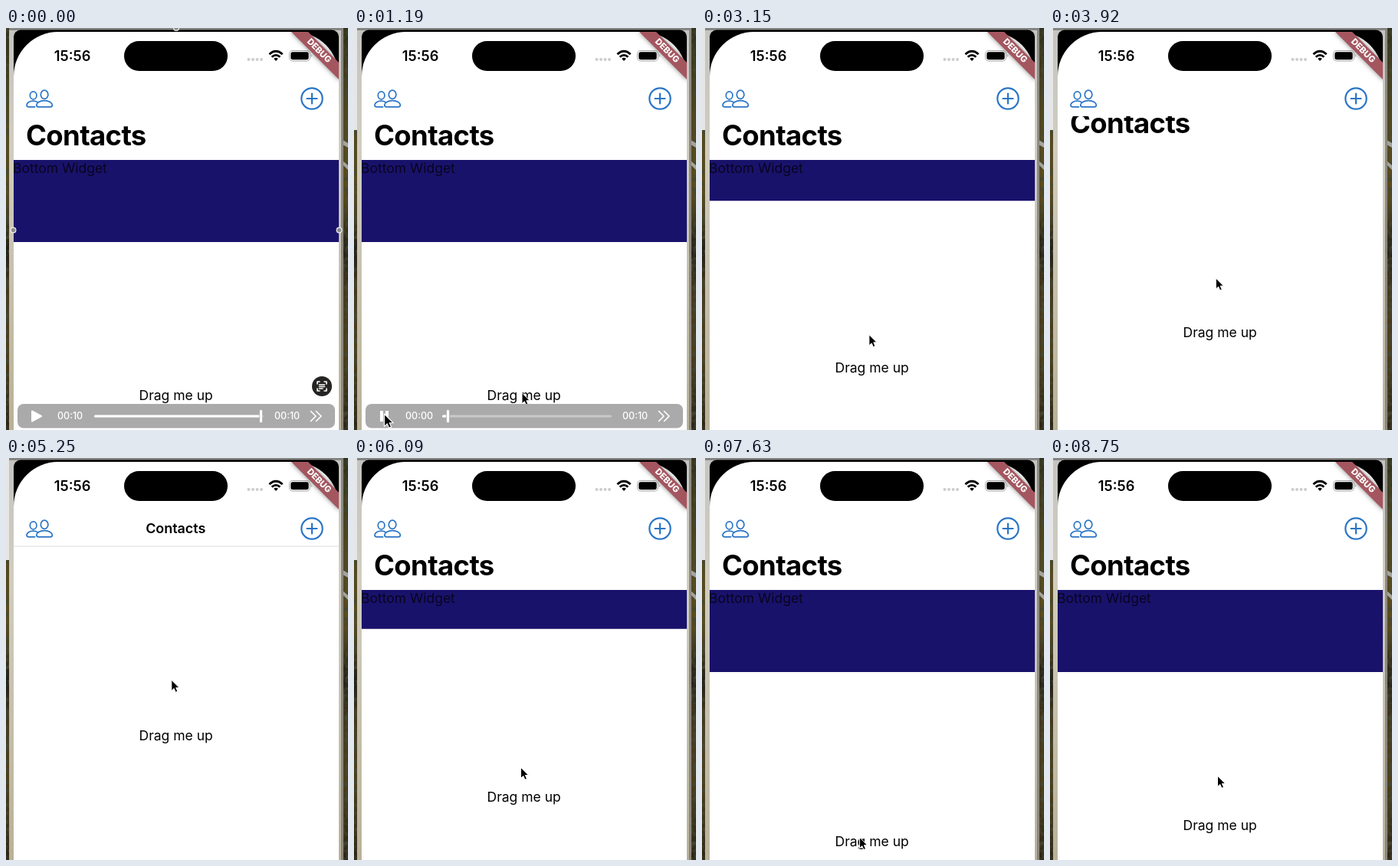
Animation of 446x524 px, one loop 8.82 s. Source, as an HTML page:

```html
<!DOCTYPE html>
<html lang="en">
<head>
<meta charset="utf-8">
<style>
  html, body { margin: 0; width: 100%; height: 100%; overflow: hidden; background: #fff; }
  svg { display: block; }
  text { font-family: Inter, Roboto, sans-serif; }
  .icon { fill: none; stroke: #2a75c6; stroke-width: 1.7; stroke-linecap: round; stroke-linejoin: round; }
  .line { fill: none; stroke: #fff; stroke-width: 1.6; stroke-linecap: round; stroke-linejoin: round; }
  .time { font-size: 12.5px; font-weight: 500; fill: #fff; }
  .ribbon { fill: #a4565f; filter: drop-shadow(0 0 3px rgba(0, 0, 0, .5)); }
</style>
</head>
<body>
<svg width="446" height="524" viewBox="0 0 446 524">
  <defs>
    <linearGradient id="leaves" x2="0" y2="1">
      <stop offset="0" stop-color="#30321c"/>
      <stop offset=".25" stop-color="#574a1c"/>
      <stop offset=".42" stop-color="#5c4b1d"/>
      <stop offset=".55" stop-color="#211f17"/>
      <stop offset=".65" stop-color="#44371c"/>
      <stop offset=".8" stop-color="#4d3f1a"/>
      <stop offset="1" stop-color="#2c2415"/>
    </linearGradient>
    <linearGradient id="rim" x2="0" y2="1">
      <stop offset="0" stop-color="#c4c4c1"/>
      <stop offset=".3" stop-color="#d0cdbf"/>
      <stop offset="1" stop-color="#b9b197"/>
    </linearGradient>
    <filter id="foliage" x="0" y="0" width="1" height="1">
      <feTurbulence type="fractalNoise" baseFrequency=".14" numOctaves="3" seed="4"/>
      <feColorMatrix values="0 0 0 0 .06  0 0 0 0 .06  0 0 0 0 .03  3 0 0 0 -1.2"/>
    </filter>
    <clipPath id="screen"><path d="M10 524V63A58 58 0 0 1 68 5H376A58 58 0 0 1 434 63V524Z"/></clipPath>
    <clipPath id="corner"><path d="M300 5H424Q434 5 434 15V120H300Z"/></clipPath>
    <clipPath id="titleArea"><rect x="10" y="115" width="424" height="60"/></clipPath>
    <clipPath id="panelArea"><rect id="panelClip" x="10" y="172" width="424" height="107"/></clipPath>
    <path id="arrow" d="M0 0V14.2L3.3 11.2L5.4 16L8 14.9L5.9 10.2H10.2Z"
          fill="#000" stroke="#fff" stroke-width="1" stroke-linejoin="round"/>
  </defs>

  <!-- desktop and window rim -->
  <rect width="446" height="524" fill="url(#leaves)"/>
  <rect width="446" height="524" filter="url(#foliage)"/>
  <path d="M439 146L446 150V156L439 152ZM439 173L446 179V185L439 178Z" fill="#a5a49c"/>
  <rect id="otherWindow" width="5" height="133" fill="#e6e6e6"/>
  <rect x="4" width="433.5" height="524" fill="url(#rim)"/>
  <rect x="437.5" width="2.5" height="524" fill="#8b8981"/>
  <rect x="4" width="436" height="3" fill="#858583"/>
  <rect x="10" y="2.5" width="424" height="90" rx="9"/>

  <!-- phone screen -->
  <g clip-path="url(#screen)">
    <rect x="10" y="5" width="424" height="519" fill="#fff"/>
    <g clip-path="url(#titleArea)">
      <text id="largeTitle" x="26" font-size="36.5" font-weight="700" letter-spacing="-.65">Contacts</text>
    </g>
    <g clip-path="url(#panelArea)">
      <rect x="10" y="172" width="424" height="107" fill="#19126b"/>
      <text x="9" y="189" font-size="17.5" fill="#08051f">Bottom Widget</text>
    </g>
    <g id="smallTitle">
      <text x="221.2" y="98" font-size="17.9" font-weight="600" text-anchor="middle">Contacts</text>
      <path d="M10 115H434" stroke="#dedede"/>
    </g>
    <text id="label" x="221.7" font-size="17.5" text-anchor="middle">Drag me up</text>
  </g>

  <!-- status bar -->
  <text x="86.6" y="42.5" font-size="18.3" font-weight="600" text-anchor="middle">15:56</text>
  <rect x="154" y="17" width="135" height="39" rx="19.5"/>
  <path d="M316.5 41H334" stroke="#cdcdcd" stroke-width="4" stroke-linecap="round" stroke-dasharray="0 5.5"/>
  <g fill="none" stroke="#000" stroke-width="2.8">
    <path d="M343.4 34.2Q352 26.4 360.6 34.2"/>
    <path d="M346.6 37.8Q352 33 357.4 37.8"/>
  </g>
  <path d="M349.2 40Q352 37.7 354.8 40L352 43Z"/>
  <rect x="369.5" y="29.5" width="27" height="13.5" rx="4.2" fill="none" stroke="#a5a5a5"/>
  <rect x="371.3" y="31.3" width="23.4" height="9.9" rx="2.6"/>
  <path d="M398 34Q400 36.2 398 38.5Z" fill="#a5a5a5"/>

  <!-- navigation icons -->
  <g class="icon">
    <g transform="translate(-.4 -.4)">
      <ellipse cx="36" cy="88.3" rx="4.3" ry="5"/>
      <path d="M38 103.3H30Q27.4 103.3 27.4 101C27.4 98 31 95.6 36 95.6Q39.5 95.6 41.5 97"/>
      <ellipse cx="50.5" cy="87.2" rx="4.8" ry="5.6"/>
      <path d="M42.7 103.3Q40.2 103.3 40.2 101C40.2 98 44.5 95 50.5 95S60.8 98 60.8 101Q60.8 103.3 58.3 103.3Z"/>
    </g>
    <g stroke-width="2.2"><circle cx="399" cy="92" r="13.7"/><path d="M392.5 92H405.5M399 85.5V98.5"/></g>
  </g>

  <!-- debug ribbon -->
  <g clip-path="url(#corner)">
    <path class="ribbon" d="M371 4L436 69V47L393 4Z"/>
    <text transform="translate(408.6 29.4) rotate(45)" y="4" font-size="11.3" font-weight="800"
          text-anchor="middle" fill="#fff">DEBUG</text>
  </g>

  <use id="pointer" href="#arrow"/>

  <!-- player controls -->
  <g id="player">
    <rect x="15" y="490" width="414" height="31.5" rx="8" fill="#aaa"/>
    <path id="play" d="M34 499.5V512.5L46 506Z" fill="#fff" stroke="#fff" stroke-width="2" stroke-linejoin="round"/>
    <path id="pause" d="M34 499H38V513H34ZM41 499H45V513H41Z" fill="#fff"/>
    <text id="elapsed" class="time" x="67" y="510.3"></text>
    <text class="time" x="350" y="510.3">00:10</text>
    <rect x="115" y="504.5" width="221" height="3" rx="1.5" fill="#c9c9c9"/>
    <rect id="played" x="115" y="504.5" height="3" rx="1.5" fill="#fff"/>
    <rect id="knob" y="497.5" width="4" height="17" rx="1.5" fill="#fff" stroke="#aaa" stroke-width=".8"/>
    <path class="line" d="M397.5 499.5L404 506L397.5 512.5M404.5 499.5L411 506L404.5 512.5"/>
    <use id="hand" href="#arrow" transform="translate(39.5 503) scale(1.15)"/>
  </g>

  <!-- overlays shown before playback -->
  <g id="paused">
    <circle cx="412" cy="467" r="13" fill="#252423"/>
    <path class="line" d="M406 464V461H409M415 461H418V464M418 470V473H415M409 473H406V470M408.5 465H415.5M408.5 467.5H415.5M408.5 470H413"/>
    <g fill="#8d8d8d" stroke="#eee" stroke-width="1.2">
      <circle cx="222" cy="0" r="3.4"/><circle cx="9.5" cy="263.5" r="3.4"/><circle cx="434.5" cy="263.5" r="3.4"/>
    </g>
  </g>
</svg>
<script>
const LOOP = 8820, STEP = 70, START = 840, VIDEO = 10200;
const REST_Y = 479, PANEL = 107, TITLE = 57;
const $ = id => document.getElementById(id);
const set = (id, attrs) => { for (const k in attrs) $(id).setAttribute(k, attrs[k]); };
const show = (id, on) => set(id, { opacity: +on });
const clamp = (v, lo = 0, hi = 1) => Math.min(hi, Math.max(lo, v));

// Linear interpolation through [time, value] pairs.
function track(keys, t) {
  const i = keys.findIndex(k => k[0] > t);
  if (i < 0) return keys[keys.length - 1][1];
  if (i === 0) return keys[0][1];
  const [t0, a] = keys[i - 1], [t1, b] = keys[i];
  return a + (b - a) * (t - t0) / (t1 - t0);
}

const labelKeys = [[2690, 479], [3500, 416], [3920, 397], [4410, 369], [4800, 361.5], [5320, 361.5],
  [6090, 441.5], [6230, 454], [6370, 460], [6440, 460], [6720, 474], [6790, 474],
  [7000, 486], [7070, 486], [7420, 499.5], [7630, 499.5], [7770, 491], [7910, 484], [8120, 479]];
const pointerX = [[2600, 219], [3920, 216.3], [5250, 215.8], [6090, 217.5], [7420, 205.5], [7770, 205.5], [8470, 218.5]];
const pointerY = [[2590, 475.5], [2720, 457], [3500, 353], [3920, 326], [4410, 295], [4800, 289.3], [5320, 289.3],
  [6090, 403.3], [6230, 421], [6370, 429], [6440, 429], [6720, 452], [6790, 452],
  [7000, 472], [7070, 472], [7420, 494.5], [7770, 494.5], [8470, 414.3]];

function draw(t) {
  const playing = t >= START;
  const labelY = track(labelKeys, t);
  const scroll = Math.max(0, (REST_Y - labelY) * 1.5);
  const lift = clamp(scroll - PANEL, 0, TITLE);
  const collapsed = clamp((lift - 45) / 11);

  set('label', { y: labelY + 6 });
  set('panelClip', { height: clamp(PANEL - scroll, 0, PANEL) });
  set('largeTitle', { y: 153.2 - lift, opacity: 1 - collapsed });
  show('smallTitle', collapsed);
  set('pointer', { transform: `translate(${track(pointerX, t)} ${track(pointerY, t)})` });

  const progress = playing ? (t - START) / VIDEO : 1;
  const knobX = 115 + 217.5 * progress;
  const seconds = Math.floor(progress * 10);
  $('elapsed').textContent = '00:' + String(seconds).padStart(2, '0');
  set('played', { width: knobX - 115 });
  set('knob', { x: knobX - 2 });
  show('player', 1 - clamp((t - 2900) / 250));
  show('play', !playing);
  show('paused', !playing);
  for (const id of ['pause', 'hand', 'pointer', 'otherWindow']) show(id, playing);
}

function tick() {
  const t = performance.now() % LOOP;
  draw(Math.floor(t / STEP) * STEP);
  requestAnimationFrame(tick);
}
tick();
</script>
</body>
</html>
```
